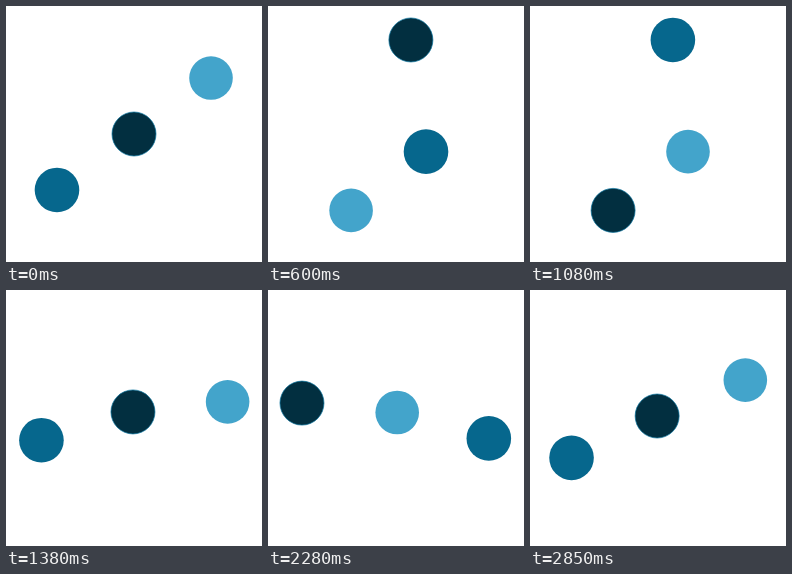
Write an HTML page that moves like this. It is 256 by 256 pixels and loops after 2880 ms.

```html
<!DOCTYPE html>
<html>
<head>
<meta charset="utf-8">
<style>
html, body { margin: 0; height: 100%; overflow: hidden; background: #fff; }
svg { display: block; width: 100vw; height: 100vh; }
</style>
</head>
<body>
<svg viewBox="0 0 256 256">
  <circle r="21.8" fill="#43a4cb"/>
  <circle r="22.3" fill="#06678d"/>
  <circle r="22" fill="#022f40" stroke="#0a759f" stroke-width=".7"/>
</svg>
<script>
const FRAME = 30, STAGE = 480, CYCLE = 3 * STAGE;
const CENTER = 128, ARM = 95.2;
const balls = document.querySelectorAll('circle');
const rad = deg => deg * Math.PI / 180;
const smooth = u => u * u * (3 - 2 * u);

// Half turn that overshoots to 190 degrees, then settles back to 180
function swing(x) {
  const peak = 13 / 16;
  return x < peak
    ? 190 * smooth(x / peak)
    : 190 - 10 * smooth((x - peak) / (1 - peak));
}

// Stages: ride the end of the arm, swing to the centre, swing out to the far end
function position(time) {
  const q = time % CYCLE;
  const stage = Math.floor(q / STAGE);
  let along = ARM, across = 0;
  if (stage > 0) {
    const turn = rad(swing(q / STAGE - stage));
    along = ARM * (1.5 - stage + Math.cos(turn) / 2);
    across = -ARM * Math.sin(turn) / 2;
  }
  const a = rad(36 + q * 180 / STAGE);
  return [
    CENTER + along * Math.cos(a) - across * Math.sin(a),
    CENTER - along * Math.sin(a) - across * Math.cos(a)
  ];
}

const start = performance.now();
function draw() {
  const elapsed = performance.now() - start;
  const time = Math.floor(elapsed / FRAME) * FRAME;
  balls.forEach((ball, i) => {
    const [x, y] = position(time + i * STAGE);
    ball.setAttribute('cx', x);
    ball.setAttribute('cy', y);
  });
  requestAnimationFrame(draw);
}
draw();
</script>
</body>
</html>
```
